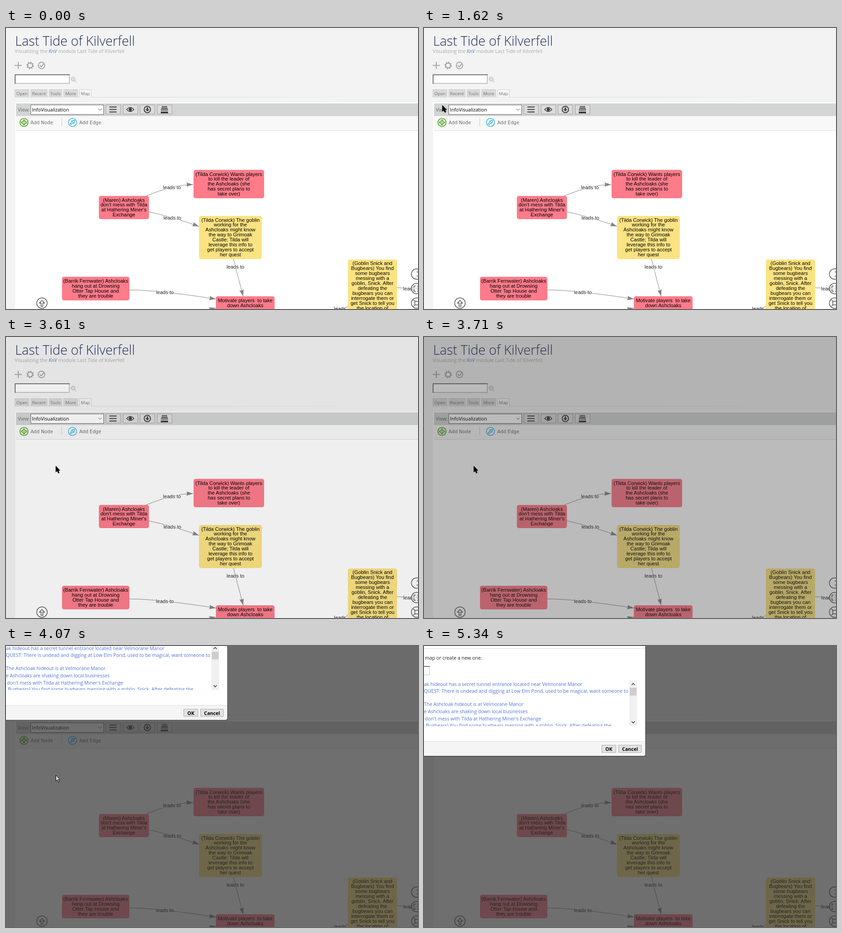
These frames come from a looping animation (905x619 px, 8 s). An HTML page:

```html
<!DOCTYPE html>
<html lang="en">
<head>
<meta charset="utf-8">
<title>Story map</title>
<style>
html, body { margin: 0; width: 100%; height: 100%; overflow: hidden; background: #f3f3f3; }
svg { display: block; }
text { font: 10.6px "Open Sans", sans-serif; white-space: pre; }
.title { font-size: 28.8px; font-weight: 300; fill: #1c2b5a; }
.sub { font-size: 10.8px; fill: #ababab; }
.sub tspan { font-style: italic; fill: #5b7fbd; }
.icon { fill: none; stroke: #a4a4a4; stroke-width: 2; }
.tab { font-size: 9.6px; fill: #707070; text-anchor: middle; }
.dark { fill: none; stroke: #3c3c3c; stroke-width: 2; }
.tool text { font: 10.1px "DejaVu Sans", sans-serif; fill: #6a6a6a; }
.node text, .edge text { font: 11.1px "Liberation Sans", Arial, sans-serif; text-anchor: middle; }
.edge text { fill: #262626; stroke: #fff; stroke-width: 2; paint-order: stroke; }
.line { fill: none; stroke: #848484; }
.head { fill: #848484; }
.hot .line { stroke-width: 2; }
.hot .head { stroke: #848484; stroke-width: 1.5; }
.hot text { font-weight: bold; }
.nav { fill: none; stroke: #555; stroke-width: 1.5; }
.rows text { fill: #4f74d6; font-size: 10.5px; }
.rows .on text { fill: #fff; }
.rows rect { fill: none; }
.rows .on rect { fill: #5778d8; }
.button { font-weight: bold; text-anchor: middle; }
</style>
</head>
<body>
<svg width="905" height="619" viewBox="0 0 905 619">
  <defs>
    <linearGradient id="fade"><stop offset=".55" stop-color="#dadada"/><stop offset="1" stop-color="#f3f3f3"/></linearGradient>
    <clipPath id="list"><rect x="0" y="76" width="451" height="100.5"/></clipPath>
  </defs>
  <rect width="905" height="619" fill="#f3f3f3"/>
  <text class="title" x="20" y="38.500">Last Tide of Kilverfell</text>
  <text class="sub" x="19" y="55">Visualizing the <tspan>KnV</tspan> module Last Tide of Kilverfell</text>
  <g class="icon">
    <path d="M19 82.500h16M27 74.500v16"/>
    <circle cx="53" cy="82.500" r="5.300" stroke-width="2.400"/>
    <circle cx="53" cy="82.500" r="7.300" stroke-width="1.800" stroke-dasharray="2.870 2.870"/>
    <circle cx="78" cy="82.500" r="7.200"/><path d="M74 82l3.500 3.500L84 78"/>
    <g stroke="#c4c4c4"><circle cx="147.500" cy="112.500" r="4"/><path d="M150.500 115.500l4 4M145.500 112.500h4" stroke-width="1.500"/></g>
  </g>
  <rect x="19" y="102" width="121" height="21" fill="#fff"/>
  <path d="M139 103v19H20" fill="none" stroke="#c3c3c3" stroke-width="2"/>
  <path d="M20 123V103h120" fill="none" stroke="#767676" stroke-width="2"/>
  <rect x="19" y="152" width="760" height="1" fill="url(#fade)"/>
  <g id="tabs"></g>

  <rect x="20" y="164" width="885" height="455" fill="#fff"/>
  <rect x="22" y="166" width="883" height="28" fill="#d3d5d4"/>
  <rect x="22" y="194" width="883" height="31" fill="#f8f8f8"/>
  <path d="M22 225.500H905" stroke="#dadada"/>
  <text x="26" y="184" fill="#666">View:</text>
  <rect x="54.500" y="169.500" width="160" height="21" fill="#fff" stroke="#666"/>
  <text x="57" y="184">InfoVisualization</text>
  <path d="M203 178l3.500 3.500 3.500-3.500" fill="none" stroke="#444"/>
  <g id="buttons"></g>
  <g class="dark">
    <path d="M227 174h16M227 179.500h16M227 185h16"/>
    <path d="M265 179.500q8-9 16 0q-8 9-16 0z" stroke-width="1.500"/><circle cx="273" cy="179.500" r="2.500" fill="#3c3c3c"/>
    <circle cx="310.500" cy="179.500" r="7"/><path d="M310.500 175v6" stroke-width="3"/><path d="M306 179h9l-4.500 5z" fill="#3c3c3c" stroke="none"/>
    <path d="M342 173.500h12M341 177h14M340 180.500h16M340 185h16" stroke-width="2.200"/><path d="M340 187h16"/>
  </g>

  <g class="tool" id="mainTools">
    <g fill="none" stroke="#4ba321" stroke-width="1.700"><circle cx="39.500" cy="208" r="9"/><path d="M38 202.500h3v4h4v3h-4v4h-3v-4h-4v-3h4z"/></g>
    <text x="54" y="212">Add Node</text>
    <path d="M122.500 198v18" stroke="#c6c6c6"/>
    <g fill="none" stroke="#3bb3e6" stroke-width="1.500"><circle cx="146" cy="208" r="9"/><path d="M141 211l4.500-4.500-1.500-1.500 6.500-1.500-1.500 6.500-1.500-1.500-4.500 4.500z"/></g>
    <text x="161" y="212">Add Edge</text>
  </g>
  <g class="tool" id="placeTools">
    <g fill="none" stroke="#777" stroke-width="1.500"><circle cx="39.500" cy="208" r="9"/><path d="M33.500 208l4-3.500v2h8v3h-8v2z"/></g>
    <text x="54" y="212">Back</text>
    <path d="M96.500 198v18" stroke="#c6c6c6"/>
    <text x="129" y="212">Click in an empty space to place a new node.</text>
  </g>

  <g id="map"></g>
  <g class="nav">
    <circle cx="79" cy="606" r="11.500"/><path d="M77 613v-7h-3.500l5.500-6 5.500 6h-3.500v7z"/>
    <g fill="#fff" fill-opacity=".6"><circle cx="902" cy="542" r="11.500"/><circle cx="902" cy="574" r="11.500"/><circle cx="902" cy="606" r="11.500"/></g>
    <path d="M902 537.500h3M902 546.500h3M900 568.500h-4v4M896 576v4h4M903 568.500h2M903 580h2M898 602h7M898 602v8h7M895 599l3 3M895 613l3-3"/>
  </g>

  <rect id="dim" width="905" height="619" fill="#333"/>
  <g id="dialog">
    <rect x="-10" y="-500" width="497" height="744" rx="4" fill="#000" opacity=".25"/>
    <rect x="-10" y="-500" width="496" height="742" rx="4" fill="#fff"/>
    <rect x="-10" y="210" width="496" height="32" rx="4" fill="#f5f5f5"/>
    <path d="M0 5.500H486M0 210.500H486" stroke="#ddd"/>
    <text x="2" y="30" fill="#222">map or create a new one.</text>
    <path d="M0 45H13" stroke="#777" stroke-width="2"/><path d="M12.500 45V63.500H0" fill="none" stroke="#bbb"/>
    <g class="rows" id="rows" clip-path="url(#list)"></g>
    <rect x="451" y="76" width="17" height="100" fill="#f0f0f0"/>
    <rect x="452" y="92" width="15" height="17" fill="#cdcdcd"/>
    <path d="M456 86l3.500-3.500 3.500 3.500M456 166l3.500 3.500 3.500-3.500" fill="none" stroke="#444" stroke-width="1.600"/>
    <g fill="#e2e2e2" stroke="#adadad"><rect x="390.500" y="218.500" width="31" height="16"/><rect x="427.500" y="218.500" width="50" height="16"/></g>
    <text class="button" x="406" y="231">OK</text>
    <text class="button" x="452.500" y="231">Cancel</text>
  </g>
  <path id="cursor" d="M.5 .5V13.500L3.400 10.700L5.800 16L8 15L5.700 10H9.500Z" stroke="#000"/>
</svg>
<script>
const $ = id => document.getElementById(id);
const LOOP = 8000;

$('tabs').innerHTML = [['Open', 19, 32], ['Recent', 54, 37], ['Tools', 94, 29], ['More', 126, 32], ['Map', 161, 27]]
  .map(([name, x, w]) => {
    const active = name === 'Map';
    return `<path d="M${x + .5} 152.500V135.500h${w - 1}V152.500" fill="${active ? '#f5f5f5' : '#dadada'}" stroke="#cfcfcf"/>
      <text class="tab" x="${x + w / 2}" y="148">${name}</text>`;
  }).join('');

$('buttons').innerHTML = [219, 257, 294, 332]
  .map(x => `<rect x="${x + .5}" y="169.500" width="32" height="20" fill="#dcdcdc" stroke="#a2a2a2"/>`).join('');

const RED = '#fe7b8a', YELLOW = '#fce381';
// x, y, width, height, fill, first line centre, lines
const nodes = [
  [412, 312.5, 155, 62.5, RED, 322, '(Tilda Corwick) Wants players|to kill the leader of|the Ashcloaks (she|has secret plans to|take over)'],
  [204, 370, 110, 51, RED, 379, "(Maren) Ashcloaks|don't mess with Tilda|at Hathering Miner's|Exchange"],
  [424, 414, 138, 95, YELLOW, 423, '(Tilda Corwick) The goblin|working for the|Ashcloaks might know|the way to Grimoak|Castle; Tilda will|leverage this info to|get players to accept|her quest'],
  [123, 548, 148, 52, RED, 557.5, '(Barrik Fernwater) Ashcloaks|hang out at Drowsing|Otter Tap House and|they are trouble'],
  [461, 591, 129, 50, RED, 600.5, 'Motivate players  to take|down Ashcloaks'],
  [751, 510, 108, 130, YELLOW, 518.5, '(Goblin Snick and|Bugbears) You find|some bugbears|messing with a|goblin, Snick. After|defeating the|bugbears you can|interrogate them or|get Snick to tell you|the location of']
];
// from, to, start point, label point, end point
const edges = [
  ['maren', 'plan', 308, 370, 364.5, 351, 411, 345],
  ['maren', 'castle', 314, 405, 365.5, 418, 424, 437],
  ['castle', 'goal', 500, 509, 504, 526, 521, 591],
  ['barrik', 'goal', 271, 577, 349, 582, 461, 597],
  ['other', 'goal', 330, 640, 390, 630, 461, 617],
  ['goal', 'snick', 690, 632, 740, 618, 751, 610],
  ['snick', 'next', 859, 572, 892, 573.5, 940, 574]
];

const drawEdge = ([, , ax, ay, mx, my, bx, by]) => {
  const cx = 2 * mx - (ax + bx) / 2, cy = 2 * my - (ay + by) / 2;
  const angle = Math.atan2(by - cy, bx - cx) * 180 / Math.PI;
  return `<g class="edge"><path class="line" d="M${ax} ${ay}Q${cx} ${cy} ${bx} ${by}"/>
    <path class="head" transform="translate(${bx} ${by}) rotate(${angle})" d="M0 0L-14.500 -4.700L-13 0L-14.500 4.700Z"/>
    <text x="${mx}" y="${my + 4}">leads to</text></g>`;
};
const drawNode = ([x, y, w, h, fill, top, lines]) =>
  `<g class="node"><rect x="${x}" y="${y}" width="${w}" height="${h}" rx="4.500" fill="${fill}"/>` +
  lines.split('|').map((s, i) => `<text x="${x + w / 2}" y="${top + 3.5 + i * 10.95}">${s}</text>`).join('') + '</g>';
$('map').innerHTML = edges.map(drawEdge).join('') + nodes.map(drawNode).join('');
const edgeGroups = document.querySelectorAll('.edge');

// top, height, text x, baseline, text
$('rows').innerHTML = [
  [77, 14, 0, 88, 'ak hideout has a secret tunnel entrance located near Velmorane Manor'],
  [91, 30, 0, 103, 'QUEST: There is undead and digging at Low Elm Pond, used to be magical, want someone to'],
  [121, 16, 0, 132, 'The Ashcloak hideout is at Velmorane Manor'],
  [137, 16, 0, 148, 'e Ashcloaks are shaking down local businesses'],
  [153, 15, 2, 164, "don't mess with Tilda at Hathering Miner's Exchange"],
  [168, 16, 4, 178.5, 'Bugbears) You find some bugbears messing with a goblin, Snick. After defeating the']
].map(([y, h, x, base, s]) => `<g><rect y="${y}" width="451" height="${h}"/><text x="${x}" y="${base}">${s}</text></g>`).join('');
const rowGroups = [...$('rows').children];

// The screen only updates at these beats: first, last, count
const beats = [[0, 0, 1], [70, 220, 3], [370, 550, 3], [780, 1540, 11], [1620, 1710, 2], [1860, 1940, 2], [2090, 2560, 7],
  [2730, 2730, 1], [2880, 3120, 4], [3290, 3440, 3], [3610, 3780, 3], [3870, 4150, 4], [4370, 5090, 10], [5340, 5340, 1]];
// time, x, y
const cursorPath = [[70, 800, 585], [145, 660, 520], [220, 545, 470], [370, 425, 425], [460, 300, 400], [550, 210, 388],
  [780, 197, 387], [1160, 90, 240], [1390, 14, 107], [1540, 5, 123], [1620, 40, 170], [1710, 93, 212], [1860, 80, 206],
  [1940, 74, 206], [2090, 74, 206], [2560, 158, 259], [2730, 158, 259], [3120, 109, 284], [4150, 109, 284],
  [4370, 110, 270], [4770, 120, 186]];
// start time, value
const hovered = [[0, ''], [70, 'snick'], [145, ''], [220, 'castle'], [370, ''], [460, 'maren'], [850, '']];
const picked = [[0, -1], [4850, 5], [4930, 4], [5010, 2], [5090, 0], [5340, -1]];

const ease = x => { x = Math.min(1, Math.max(0, x)); return x * x * (3 - 2 * x); };
const at = (list, t) => list.filter(e => e[0] <= t).pop();
const show = (el, on) => el.style.display = on ? '' : 'none';

function lastBeat(t) {
  const [a, b, n] = at(beats, t);
  if (t >= b) return b;
  const gap = (b - a) / (n - 1);
  return a + Math.floor((t - a) / gap + 1e-6) * gap;
}

function cursorAt(t) {
  const i = cursorPath.findIndex(k => k[0] > t);
  if (i < 0) return cursorPath[cursorPath.length - 1].slice(1);
  const [t0, x0, y0] = cursorPath[i - 1], [t1, x1, y1] = cursorPath[i], p = (t - t0) / (t1 - t0);
  return [x0 + (x1 - x0) * p, y0 + (y1 - y0) * p];
}

function render(now) {
  const t = lastBeat(now % LOOP);

  const hot = at(hovered, t)[1];
  edges.forEach((e, i) => edgeGroups[i].classList.toggle('hot', e[0] === hot || e[1] === hot));

  const placing = t >= 2090 && t < 3290;
  show($('mainTools'), !placing);
  show($('placeTools'), placing);

  $('dim').setAttribute('opacity', .7 * ease((t - 3550) / 300));
  $('dialog').setAttribute('transform', `translate(0 ${-900 * (1 - ease((t - 3640) / 510))})`);
  const row = at(picked, t)[1];
  rowGroups.forEach((g, i) => g.classList.toggle('on', i === row));

  const cursorOn = t >= 70 && t < 4850;
  show($('cursor'), cursorOn);
  if (cursorOn) $('cursor').setAttribute('transform', `translate(${cursorAt(t)})`);
  $('cursor').setAttribute('fill', t >= 3780 ? '#ddd' : '#000');
}

function tick() {
  render(performance.now());
  requestAnimationFrame(tick);
}
tick();
</script>
</body>
</html>
```
